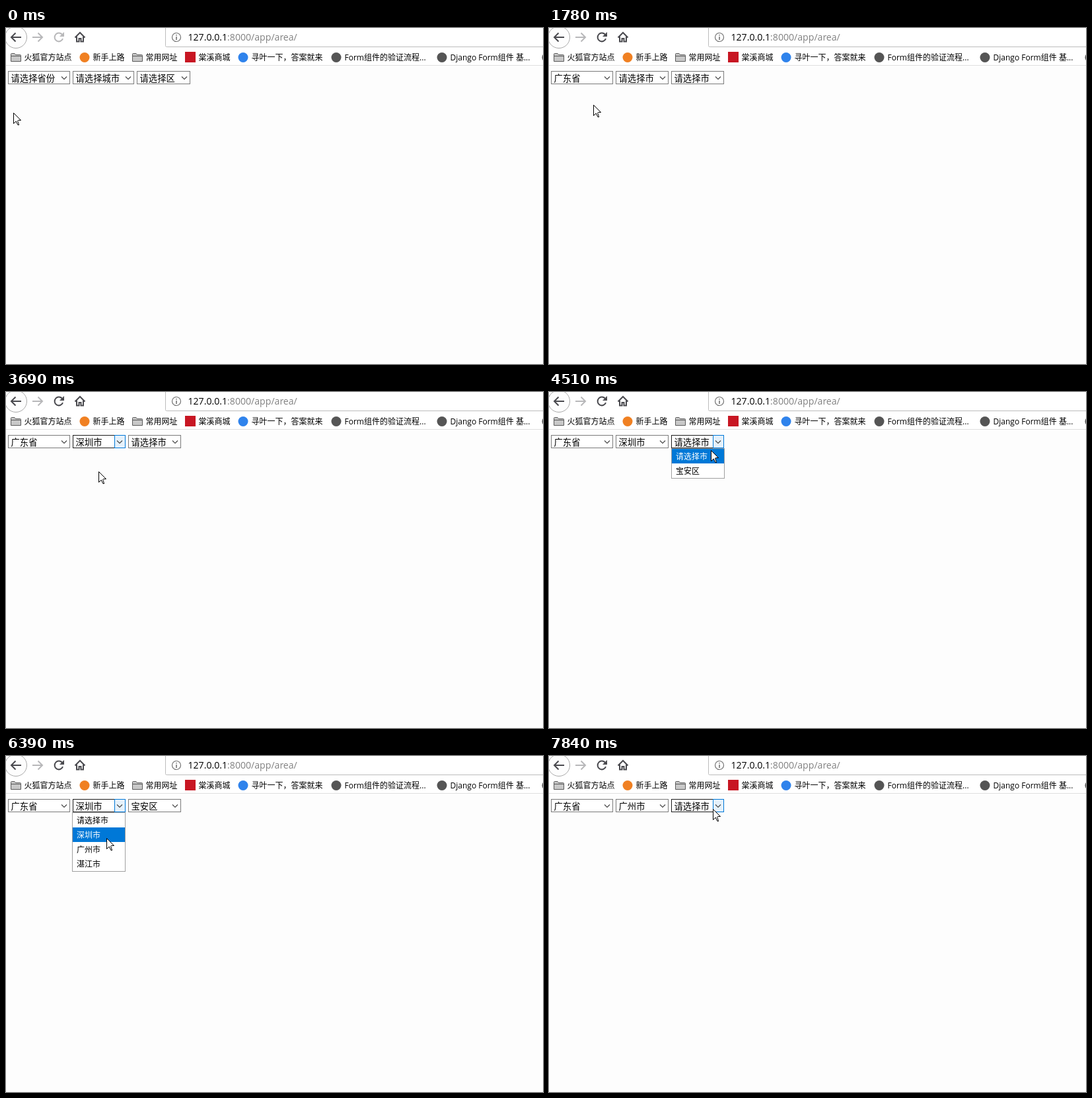
Animation, 813 px wide and 508 px high, one loop 7.99 s. Source, as an HTML page:

```html
<!DOCTYPE html>
<html lang="zh-CN">
<head>
<meta charset="utf-8">
<title>Area select</title>
<style>
html, body { margin: 0; width: 100%; height: 100%; overflow: hidden; background: #fdfdfd; }
svg { display: block; }
text { font-family: "Open Sans", "Noto Sans CJK SC", "Noto Sans CJK", sans-serif; font-size: 12px; fill: #000; }
.url { font-size: 14.1px; }
.sel { font-size: 13.33px; }
rect { shape-rendering: crispEdges; }
</style>
</head>
<body>
<svg width="813" height="508" viewBox="0 0 813 508">
  <rect width="813" height="508" fill="#fdfdfd"/>
  <rect width="813" height="56" fill="#fff"/>
  <rect y="56" width="813" height="1" fill="#e0e0e0"/>
  <g fill="none" stroke="#4a4a4f" stroke-width="2">
    <circle cx="15" cy="14" r="16.5" fill="#fdfdfd" stroke="#a9a9a9" stroke-width="1"/>
    <path d="M23 14H8.5M14.5 7.5L8 14L14.5 20.5"/>
    <path d="M40 14H54.5M48.5 7.5L55 14L48.5 20.5" stroke="#b8b8ba"/>
    <g id="reload" stroke="currentColor">
      <path d="M85.2 10.2A6.4 6.4 0 1 0 86 16.2"/>
      <path d="M88 6V13H81Z" fill="currentColor" stroke="none"/>
    </g>
    <path d="M104.5 14.5L112 7L119.5 14.5"/>
    <path d="M107 13V20.5H110.5V16H113.5V20.5H117V13"/>
  </g>
  <path d="M241.5 0V26.5Q241.5 28.5 243.5 28.5H813" fill="none" stroke="#bcbcbc"/>
  <circle cx="258" cy="14" r="6.5" fill="none" stroke="#737373" stroke-width="1.2"/>
  <path d="M258 13V18M258 10V11.6" stroke="#737373" stroke-width="1.6"/>
  <text class="url" x="275.5" y="19">127.0.0.1<tspan fill="#808080">:8000/app/area/</tspan></text>
  <g id="marks"></g>
  <g id="page"></g>
  <path id="cursor" d="M.5 .5V16.5L4.2 13L6.9 18.5H8.6L6.6 12.2L7.5 11.5H11.5Z" fill="#fff" stroke="#000"/>
</svg>
<script>
const LOOP = 7990, FRAME = 136, LEAD = 50;
const ROW = 22, LIST_TOP = 86;
const $ = id => document.getElementById(id);
const box = (x, y, w, h, fill, line) => line
  ? `<rect x="${x + .5}" y="${y + .5}" width="${w - 1}" height="${h - 1}" fill="${fill}" stroke="${line}"/>`
  : `<rect x="${x}" y="${y}" width="${w}" height="${h}" fill="${fill}"/>`;
const label = (x, y, s, attr = '') => `<text x="${x}" y="${y}" ${attr}>${s}</text>`;

// Bookmarks bar
const folder = x => `<path transform="translate(${x} 38)" d="M.5 12.5V1.5Q.5 .5 1.5 .5H6L7.5 2.5H14.5Q15.5 2.5 15.5 3.5V12.5ZM.5 4.5H15.5" fill="#c8c8c8" stroke="#5a5a5a"/>`;
const dot = (x, c) => `<circle cx="${x + 8}" cy="44.5" r="7.5" fill="${c}"/>`;
const tile = (x, c) => box(x, 36, 16, 16, c);
$('marks').innerHTML = [
  [7, '火狐官方站点', folder],
  [111, '新手上路', dot, '#f08022'],
  [191, '常用网址', folder],
  [271, '棠溪商城', tile, '#c81623'],
  [351, '寻叶一下，答案就来', dot, '#2f83ec'],
  [492, 'Form组件的验证流程...', dot, '#555'],
  [652, 'Django Form组件 基...', dot, '#555'],
  [811, '', dot, '#555']
].map(([x, s, icon, c]) => icon(x, c) + label(x + 20.5, 49, s)).join('');

const lists = [
  { x: 3, w: 93, items: ['请选择省份', '广东省', '湖南省'] },
  { x: 100, w: 81, items: ['请选择市', '深圳市', '广州市', '湛江市'] },
  { x: 185, w: 81, items: ['请选择市', '宝安区'] }
];

// Each visit, in ticks: reach the button, open the list, land on a row at x, pick it, leave
const visits = [
  { sel: 0, reach: 4, open: 7, land: 10, pick: 13, leave: 12, row: 1, x: 56 },
  { sel: 1, reach: 16, open: 18, land: 22, pick: 27, leave: 27, row: 1, x: 140 },
  { sel: 2, reach: 30, open: 32, land: 35, pick: 39, leave: 38.6, row: 1, x: 234 },
  { sel: 1, reach: 42, open: 44, land: 49, pick: 53, leave: 53, row: 2, x: 146 },
  { sel: 2, reach: 58 }
];

// Selects sit in a line, so a narrower one pulls in the next
function layout(filled) {
  let x = 3;
  return (filled ? [94, 80, 80] : [94, 93, 81]).map(w => {
    const spot = { x, w };
    x += w + 4;
    return spot;
  });
}

const buttons = layout(true).map(s => ({ x: s.x + s.w - 17, y: 80 }));
const stops = [{ f: 0, x: 11, y: 128 }];
for (const v of visits) {
  const b = buttons[v.sel];
  stops.push({ f: v.reach, ...b });
  if (!v.open) continue;
  const spot = { x: v.x, y: LIST_TOP + ROW * v.row + (v.row > 1 ? 14 : 12) };
  stops.push({ f: v.open, ...b }, { f: v.land, ...spot }, { f: v.leave, ...spot });
}

const ease = p => p * p * p * (p * (p * 6 - 15) + 10);
function pointer(f) {
  const i = stops.findIndex(s => s.f > f);
  if (i < 0) return stops[stops.length - 1];
  const a = stops[i - 1], b = stops[i];
  const k = ease((f - a.f) / (b.f - a.f));
  return { x: Math.round(a.x + (b.x - a.x) * k), y: Math.round(a.y + (b.y - a.y) * k) };
}

function select({ x, w }, s, hot) {
  const r = x + w;
  return box(x, 65, w, 20, '#fff', hot ? '#1c1c1c' : '#7a7a7a') +
    (hot ? box(r - 17, 65, 17, 20, '#e5f1fb', '#0078d7') : '') +
    `<path d="M${r - 13} 73.5L${r - 9} 77.5L${r - 5} 73.5" fill="none" stroke="#444" stroke-width="1.1"/>` +
    label(x + 4.5, 81, s, 'class="sel"');
}

function dropdown({ x, w, items }, picked, y) {
  const row = y < LIST_TOP ? picked : Math.floor((y - LIST_TOP) / ROW);
  return box(x, LIST_TOP - 1, w, items.length * ROW + 2, '#fff', '#a0a0a0') +
    items.map((s, i) => {
      const top = LIST_TOP + i * ROW, on = i === row;
      return (on ? box(x + 1, top, w - 2, ROW, '#0078d7') : '') +
        label(x + 7, top + 16, s, `style="fill:${on ? '#fff' : '#000'}"`);
    }).join('');
}

function render(t) {
  const f = Math.floor((t + LEAD) / FRAME);
  const { x, y } = pointer(f);
  const picked = [0, 0, 0];
  for (const v of visits) {
    if (f < v.pick || !v.pick) continue;
    picked[v.sel] = v.row;
    picked.fill(0, v.sel + 1);
  }
  const names = picked.map((p, i) => lists[i].items[p]);
  if (!picked[0]) names.splice(1, 2, '请选择城市', '请选择区');
  const hot = visits.find(v => f >= v.reach && f <= (v.leave || LOOP));
  const open = visits.find(v => f >= v.open && f < v.pick);

  $('page').innerHTML =
    layout(picked[0]).map((s, i) => select(s, names[i], hot && hot.sel === i)).join('') +
    (open ? dropdown(lists[open.sel], picked[open.sel], y) : '');
  $('reload').setAttribute('color', f < 1 ? '#b8b8ba' : '#4a4a4f');
  $('cursor').setAttribute('transform', `translate(${x} ${y})`);
}

const start = performance.now();
function tick() {
  render((performance.now() - start) % LOOP);
  requestAnimationFrame(tick);
}
tick();
</script>
</body>
</html>
```
